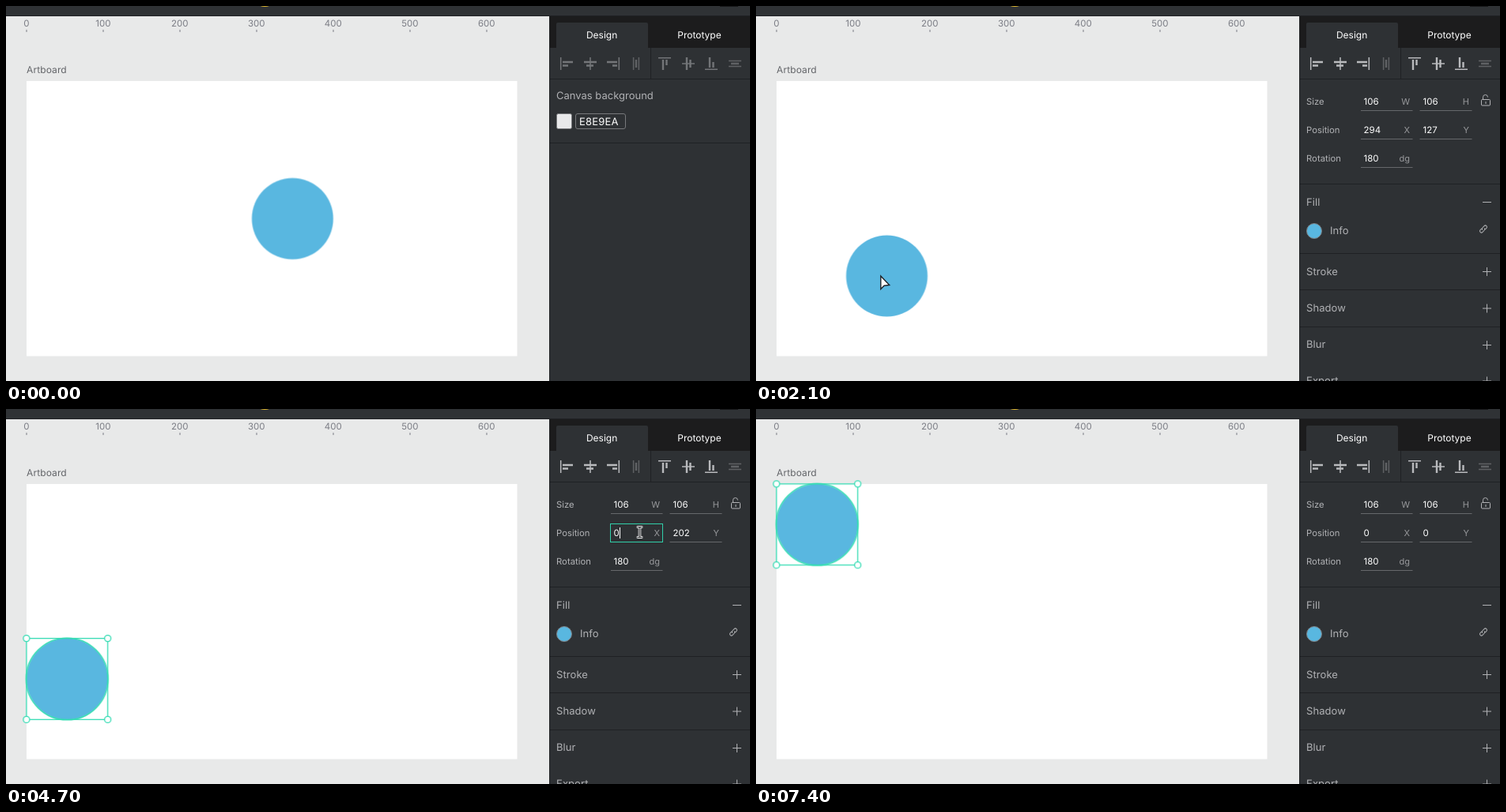
Write an HTML page that moves like this. It is 941 by 475 pixels and loops after 7.5 s.

```html
<!DOCTYPE html>
<html lang="en">
<head>
<meta charset="utf-8">
<title>Moving a shape by its position fields</title>
<style>
html, body { margin: 0; width: 100%; height: 100%; overflow: hidden; background: #e8e9e9; }
svg { display: block; width: 941px; height: 475px; }
text { font: 13px Inter, "Open Sans", sans-serif; fill: #b1b2b5; text-rendering: geometricPrecision; }
.ruler text { font-size: 11.5px; fill: #7b7d85; text-anchor: middle; }
.ruler path { stroke: #7b7d85; }
.title { font-size: 12px; fill: #64666a; letter-spacing: .1px; }
.tab { font-size: 12px; fill: #fff; text-anchor: middle; }
.label { font-size: 11.3px; }
.value { font-size: 11.5px; fill: #fff; }
.unit { font-size: 11px; text-anchor: end; fill: #98999c; }
.head { letter-spacing: .08px; }
.line { stroke: #1f2124; fill: none; }
.rule { stroke: #66686b; fill: none; }
.icon { stroke: #b1b2b5; fill: none; }
.thin { stroke: currentColor; stroke-width: 1.5; }
.bar { stroke: currentColor; stroke-width: 2.4; }
.dim { color: #5f6164; }
.teal { stroke: #31dbb2; fill: none; }
.focus { stroke: #31cfa9; fill: none; }
.mark { fill: #1264c8; }
.caret { stroke: #fff; }

.a { animation: 7.5s step-end infinite; }
.off { opacity: 0; }
#idle { animation-name: idle; }
#props { animation-name: props; }
#tools { color: #737578; animation-name: tools; }
#shape { transform: translate(362.4px, 269.4px); animation-name: shape; }
#outline { animation-name: outline; }
#frame { animation-name: frame; }
#arrow { animation-name: arrow; }
#beam { animation-name: beam; }
#xOld, #yOld { animation-name: old; }
#xMid { animation-name: xMid; }
#xNew { animation-name: xNew; }
#yMid { animation-name: yMid; }
#yNew { animation-name: yNew; }
#xFocus { animation-name: xFocus; }
#yFocus { animation-name: yFocus; }
#xMark { animation-name: xMark; }
#yMark { animation-name: yMark; }
#xCaret { animation-name: xCaret; }
#yCaret { animation-name: yCaret; }

@keyframes idle { 14.66% { opacity: 0 } }
@keyframes props { 14.66% { opacity: 1 } }
@keyframes tools { 14.66% { color: #b9babd } }
@keyframes outline { 10.66% { opacity: 1 } 22.66% { opacity: 0 } 33.33% { opacity: 1 } }
@keyframes frame { 14.66% { opacity: 1 } 22.66% { opacity: 0 } 33.33% { opacity: 1 } }
@keyframes old { 33.33% { opacity: 0 } }
@keyframes xMid { 33.33% { opacity: 1 } 62.66% { opacity: 0 } }
@keyframes xNew { 62.66% { opacity: 1 } }
@keyframes yMid { 33.33% { opacity: 1 } 77.33% { opacity: 0 } }
@keyframes yNew { 77.33% { opacity: 1 } }
@keyframes xFocus { 46.66% { opacity: 1 } 69.33% { opacity: 0 } }
@keyframes yFocus { 69.33% { opacity: 1 } 98.66% { opacity: 0 } }
@keyframes xMark { 47.99% { opacity: 1 } 62.66% { opacity: 0 } }
@keyframes yMark { 70.66% { opacity: 1 } 77.33% { opacity: 0 } }
@keyframes xCaret { 62.66% { opacity: 1 } 69.33% { opacity: 0 } }
@keyframes yCaret { 77.33% { opacity: 1 } 93.33% { opacity: 0 } }
@keyframes shape {
  22.66% { transform: translate(346.6px, 275.1px) }
  23.99% { transform: translate(299.4px, 292.5px) }
  25.33% { transform: translate(240.3px, 314.3px) }
  26.66% { transform: translate(189.1px, 333.2px) }
  27.99% { transform: translate(165.5px, 341.9px) }
  62.66% { transform: translate(77.3px, 341.9px) }
  77.33% { transform: translate(77.3px, 146.3px) }
}
@keyframes arrow {
  7.99% { opacity: 1; transform: translate(371px, 404px) }
  9.33% { opacity: 1; transform: translate(358px, 331px) }
  10.66% { opacity: 1; transform: translate(349px, 283px) }
  15.99% { opacity: 1; transform: translate(350px, 280px) }
  17.33% { opacity: 1; transform: translate(352px, 273px) }
  18.66% { opacity: 1; transform: translate(354px, 268.5px) }
  22.66% { opacity: 1; transform: translate(338px, 274px) }
  23.99% { opacity: 1; transform: translate(291px, 291.5px) }
  25.33% { opacity: 1; transform: translate(232px, 313.5px) }
  26.66% { opacity: 1; transform: translate(180.5px, 332px) }
  27.99% { opacity: 1; transform: translate(157px, 341px) }
  34.66% { opacity: 1; transform: translate(175px, 335px) }
  35.99% { opacity: 1; transform: translate(250px, 311px) }
  37.33% { opacity: 1; transform: translate(400px, 266px) }
  38.66% { opacity: 1; transform: translate(570px, 212px) }
  39.99% { opacity: 1; transform: translate(705px, 170px) }
  41.33% { opacity: 1; transform: translate(790px, 142px) }
  42.66% { opacity: 1; transform: translate(826px, 149px) }
  43.99% { opacity: 0; transform: translate(826px, 149px) }
  81.33% { opacity: 1; transform: translate(848px, 180px) }
  82.66% { opacity: 1; transform: translate(868px, 222px) }
  83.99% { opacity: 1; transform: translate(892px, 281px) }
  85.33% { opacity: 0; transform: translate(892px, 281px) }
}
@keyframes beam {
  43.99% { opacity: 1; transform: translate(818px, 157px) }
  45.33% { opacity: 1; transform: translate(806px, 156px) }
  46.66% { opacity: 1; transform: translate(801.5px, 156px) }
  63.99% { opacity: 1; transform: translate(830px, 156px) }
  65.33% { opacity: 1; transform: translate(880px, 156px) }
  66.66% { opacity: 1; transform: translate(900.5px, 157px) }
  69.33% { opacity: 1; transform: translate(862px, 156px) }
  70.66% { opacity: 1; transform: translate(838.5px, 156px) }
  81.33% { opacity: 0; transform: translate(838.5px, 156px) }
}
</style>
</head>
<body>
<svg viewBox="0 0 941 475">
  <!-- canvas -->
  <rect width="941" height="475" fill="#e8e9e9"/>
  <rect x="26" y="95" width="620.5" height="348.5" fill="#fff"/>
  <g class="ruler">
    <text x="26" y="26">0</text>
    <text x="122.8" y="26">100</text>
    <text x="219.8" y="26">200</text>
    <text x="316.8" y="26">300</text>
    <text x="413.8" y="26">400</text>
    <text x="510.8" y="26">500</text>
    <text x="607.8" y="26">600</text>
    <path d="M26 30v3m97-3v3m97-3v3m97-3v3m97-3v3m97-3v3m97-3v3"/>
  </g>
  <text class="title" x="26" y="85">Artboard</text>

  <g id="shape" class="a">
    <circle r="51.5" fill="#59b7e0"/>
    <circle id="outline" class="a off teal" r="51.8" stroke-width="1.5"/>
    <g id="frame" class="a off teal" stroke-width="1.3">
      <rect x="-51.4" y="-51.4" width="102.8" height="102.8"/>
      <g fill="#fff">
        <circle cx="-51.4" cy="-51.4" r="4"/>
        <circle cx="51.4" cy="-51.4" r="4"/>
        <circle cx="-51.4" cy="51.4" r="4"/>
        <circle cx="51.4" cy="51.4" r="4"/>
      </g>
    </g>
  </g>

  <!-- top bar and panel -->
  <rect width="941" height="13" fill="#2f3235"/>
  <path class="line" d="M0 12.5h941"/>
  <path d="M321.5 0h11.5q-5.5 2-11.5 0" fill="#e3b92c"/>
  <path d="M903 .5h23" stroke="#161718"/>
  <rect x="687" y="13" width="254" height="462" fill="#2e3134"/>
  <rect x="688" y="13" width="253" height="40" fill="#1c1c1d"/>
  <path d="M696 53v-30q0-2 2-2h112q2 0 2 2v30z" fill="#2e3134"/>
  <path class="line" d="M687.5 13v462M688 92.5h253M815.5 53v39"/>
  <text class="tab" x="753.6" y="41">Design</text>
  <text class="tab" x="877" y="41">Prototype</text>

  <g id="tools" class="a" fill="none">
    <path class="thin" d="M701.7 65v16M739 65v16M775.3 65v16M825 65.7h16M855 73h16M884 80.3h16"/>
    <path class="bar" d="M704 71h13M704 75.5h7M731 71h16M734 75.5h9M760 71h13M767 75.5h6M831 68v13M835.5 68v7M861 65v16M865.5 68v10M890 65v13M894.5 71v7"/>
  </g>
  <g class="dim" fill="none">
    <path class="thin" d="M793.6 65v16M800.4 65v16M914 69.5h16M914 76.5h16"/>
    <path class="bar" d="M797 68v10M917 73h10"/>
  </g>

  <g id="idle" class="a">
    <text x="696" y="118">Canvas background</text>
    <rect x="696.5" y="136.5" width="19" height="19" rx="2" fill="#e8e9ea" stroke="#77797c"/>
    <rect x="720.5" y="136.5" width="63" height="19" rx="2.5" fill="none" stroke="#77797c"/>
    <text x="725" y="151" style="fill:#fff;letter-spacing:.2px">E8E9EA</text>
    <path class="line" d="M688 173.5h253"/>
  </g>

  <g id="props" class="a off">
    <path class="rule" d="M765 132.5h65.5m9 0h66M765 168.5h65.5m9 0h66M765 204.5h65.5"/>
    <path class="line" d="M688 225.5h253m-253 88h253m-253 46h253m-253 47h253"/>
    <rect id="xFocus" class="a off focus" x="764.5" y="145.5" width="66" height="23"/>
    <rect id="yFocus" class="a off focus" x="839.5" y="145.5" width="66" height="23"/>
    <rect id="xMark" class="a off mark" x="768.5" y="150" width="12.5" height="14"/>
    <rect id="yMark" class="a off mark" x="843.5" y="150" width="22" height="14"/>

    <text class="label" x="696" y="125">Size</text>
    <text class="label" x="696" y="161">Position</text>
    <text class="label" x="696" y="197">Rotation</text>
    <text class="value" x="768.5" y="125">106</text>
    <text class="value" x="843.5" y="125">106</text>
    <text class="value" x="768.5" y="197">180</text>
    <text id="xOld" class="a value" x="768.5" y="161">294</text>
    <text id="xMid" class="a off value" x="768.5" y="161">91</text>
    <text id="xNew" class="a off value" x="768.5" y="161">0</text>
    <text id="yOld" class="a value" x="843.5" y="161">127</text>
    <text id="yMid" class="a off value" x="843.5" y="161">202</text>
    <text id="yNew" class="a off value" x="843.5" y="161">0</text>
    <path id="xCaret" class="a off caret" d="M776.5 150v14"/>
    <path id="yCaret" class="a off caret" d="M851.5 150v14"/>
    <text class="unit" x="827" y="125">W</text>
    <text class="unit" x="902" y="125">H</text>
    <text class="unit" x="827" y="161">X</text>
    <text class="unit" x="902" y="161">Y</text>
    <text class="unit" x="827" y="197">dg</text>

    <g class="icon">
      <rect x="917.5" y="118.5" width="11" height="7.5" rx="1"/>
      <path d="M919.5 118v-2.500a3 3 0 0 1 6 0M923 121v3"/>
      <g transform="translate(920 282.500) rotate(-45)">
        <path d="M-1 -2h-2.500a2 2 0 0 0 0 4h3a2 2 0 0 0 2 -2M1 2h2.500a2 2 0 0 0 0 -4h-3a2 2 0 0 0 -2 2"/>
      </g>
      <path d="M919 248.500h11M919 336.500h11m-5.500-5.500v11M919 383h11m-5.500-5.500v11M919 429.500h11m-5.500-5.500v11M919 475h11m-5.500-5.500v11"/>
    </g>
    <circle cx="706" cy="285" r="9.500" fill="#59b7e0" stroke="#7d8083"/>
    <text class="head" x="726" y="289">Info</text>
    <text class="head" x="696" y="253">Fill</text>
    <text class="head" x="696" y="341">Stroke</text>
    <text class="head" x="696" y="387">Shadow</text>
    <text class="head" x="696" y="433">Blur</text>
    <text class="head" x="696" y="479">Export</text>
  </g>

  <!-- pointers -->
  <path id="arrow" class="a off" d="M.8 1v16.500l4.300-4.300 6.600-.7z" fill="#fff" stroke="#20242a" stroke-width="1.400"/>
  <g id="beam" class="a off" fill="none">
    <path d="M-3.500 -6.500h7M0 -6.500v13M-3.500 6.500h7" stroke="#fff" stroke-width="3.200"/>
    <path d="M-2.700 -6.500h5.400M0 -6.500v13M-2.700 6.500h5.400" stroke="#15171a" stroke-width="1.200"/>
  </g>
</svg>
</body>
</html>
```
